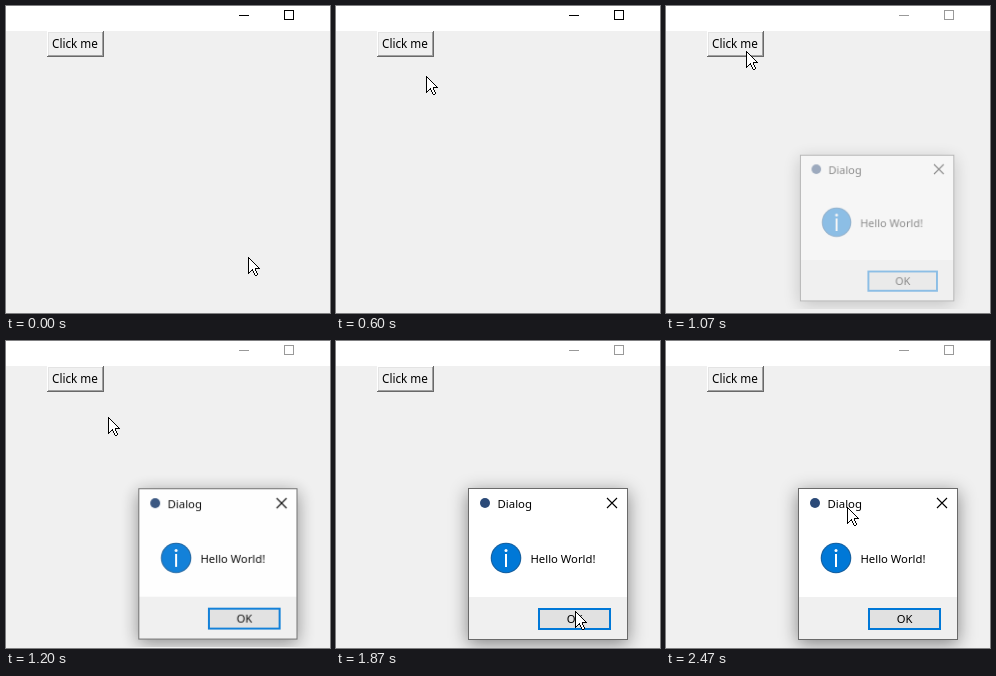
An HTML page with a canvas for the animation above (2.6 s loop, 324 px wide and 307 px high).

```html
<!DOCTYPE html>
<html lang="en">
<head>
<meta charset="utf-8">
<title>Click me</title>
<style>
html, body { margin: 0; width: 100%; height: 100%; overflow: hidden; background: #f0f0f0; }
canvas { display: block; }
</style>
</head>
<body>
<canvas id="stage" width="324" height="307"></canvas>
<script>
const W = 324, H = 307, LOOP = 2600, STEP = 1000 / 15;
const BLUE = '#0078d7', FACE = '#f0f0f0';
const FONT = '"Noto Sans", "Open Sans", sans-serif';
const stage = document.getElementById('stage').getContext('2d');
const layer = document.createElement('canvas');
layer.width = W;
layer.height = H;
const dialog = layer.getContext('2d');

// Where the pointer turns or rests: step, x, y
const TURNS = [
  [4, 242, 251], [9, 90, 70], [12, 80, 48], [16, 80, 45], [20, 145, 120],
  [21, 173, 130], [28, 239, 270], [30, 237, 278], [33, 194, 215], [37, 181, 166]
];

const clamp = v => Math.max(0, Math.min(1, v));
const smooth = v => v * v * (3 - 2 * v);

function box(c, color, x, y, w, h) {
  c.fillStyle = color;
  c.fillRect(x, y, w, h);
}

function frame(c, color, x, y, w, h, line = 1) {
  c.strokeStyle = color;
  c.lineWidth = line;
  c.strokeRect(x + line / 2, y + line / 2, w - line, h - line);
}

function disc(c, color, x, y, r) {
  c.fillStyle = color;
  c.beginPath();
  c.arc(x, y, r, 0, Math.PI * 2);
  c.fill();
}

function label(c, text, x, y, size, align = 'left') {
  c.font = `${size}px ${FONT}`;
  c.textAlign = align;
  c.fillStyle = '#000';
  c.fillText(text, x, y);
}

// Slope of one axis between turns i and i + 1; zero outside the path
function slope(i, axis) {
  const a = TURNS[i], b = TURNS[i + 1];
  return a && b ? (b[axis] - a[axis]) / (b[0] - a[0]) : 0;
}

// Harmonic mean of neighbouring slopes keeps the curve from overshooting
function tangent(i, axis) {
  const a = slope(i - 1, axis), b = slope(i, axis);
  return a * b > 0 ? 2 * a * b / (a + b) : 0;
}

function pointerAt(n) {
  const last = TURNS.length - 1;
  n = Math.max(TURNS[0][0], Math.min(TURNS[last][0], n));
  const i = Math.max(1, TURNS.findIndex(p => p[0] >= n)) - 1;
  const a = TURNS[i], b = TURNS[i + 1];
  const span = b[0] - a[0], k = (n - a[0]) / span;
  return [1, 2].map(axis => Math.round(
    a[axis] + (b[axis] - a[axis]) * smooth(k) +
    span * k * (1 - k) * ((1 - k) * tangent(i, axis) - k * tangent(i + 1, axis))
  ));
}

// The arrow is built row by row so that its edges stay crisp
function drawPointer(c, [x, y]) {
  for (let row = 0; row < 19; row++) {
    const edge = row < 12 ? row : 16 - row;
    if (edge >= 0) box(c, '#000', x, y + row, edge + 1, 1);
    if (edge > 1) box(c, '#fff', x + 1, y + row, edge - 1, 1);
    const tail = x + 4 + ((row - 12) >> 1);
    if (row > 11 && row < 18) {
      box(c, '#000', tail, y + row, 4, 1);
      box(c, '#fff', tail + 1, y + row, 2, 1);
    }
  }
  box(c, '#000', x + 7, y + 11, 5, 1);
  box(c, '#000', x + 7, y + 18, 2, 1);
}

function drawWindow(c, active, pressed) {
  box(c, FACE, 0, 0, W, H);
  box(c, '#fff', 0, 0, W, 25);
  const ink = active ? '#000' : '#999';
  box(c, ink, 233, 9, 10, 1);
  frame(c, ink, 278, 4, 10, 10);

  const edges = ['#696969', '#fff', '#a0a0a0', '#e3e3e3'];
  if (pressed) edges.reverse();
  const [outerDark, outerLight, innerDark, innerLight] = edges;
  box(c, outerDark, 41, 25, 57, 26);
  box(c, outerLight, 41, 25, 56, 25);
  box(c, innerDark, 42, 26, 55, 24);
  box(c, innerLight, 42, 26, 54, 23);
  box(c, FACE, 43, 27, 53, 22);
  const shift = pressed ? 1 : 0;
  label(c, 'Click me', 46 + shift, 42 + shift, 11.7);
}

function drawDialog(c, hover) {
  c.clearRect(0, 0, W, H);
  c.save();
  c.shadowColor = 'rgba(0,0,0,.45)';
  c.shadowBlur = 17;
  c.shadowOffsetY = 4;
  box(c, '#fff', 132, 147, 160, 152);
  c.restore();
  box(c, FACE, 133, 256, 158, 42);
  frame(c, '#6a6a6a', 132, 147, 160, 152);

  disc(c, '#2b4a78', 149, 162, 5);
  label(c, 'Dialog', 161.5, 167, 11.4);
  c.strokeStyle = '#000';
  c.lineWidth = 1.1;
  c.beginPath();
  for (const side of [-5, 5]) {
    c.moveTo(276 - side, 157);
    c.lineTo(276 + side, 167);
  }
  c.stroke();

  disc(c, '#17609f', 170, 217, 15.3);
  disc(c, BLUE, 170, 217, 14.2);
  disc(c, '#fff', 170, 209.5, 1.5);
  box(c, '#fff', 169, 213, 2, 13);
  label(c, 'Hello World!', 194.5, 222, 11.3);

  box(c, '#e1e1e1', 202, 267, 73, 22);
  frame(c, BLUE, 202, 267, 73, 22, 2);
  c.globalAlpha = hover;
  box(c, '#e5f1fb', 203, 268, 71, 20);
  c.globalAlpha = 1;
  label(c, 'OK', 238.5, 282, 11.2, 'center');
}

function render(time) {
  const n = Math.floor((time % LOOP + 4) / STEP);
  const open = smooth(clamp((n - 13.7) / 5.2));
  const hover = clamp((n - 28) / 3) * clamp((36 - n) / 3);

  drawWindow(stage, n < 15, n === 13 || n === 14);
  if (n >= 15) {
    drawDialog(dialog, hover);
    const scale = 0.94 + 0.06 * open;
    stage.save();
    stage.globalAlpha = open;
    stage.translate(186, 196);
    stage.scale(scale, scale);
    stage.drawImage(layer, -186, -196);
    stage.restore();
  }
  drawPointer(stage, pointerAt(n));
}

const start = performance.now();
function tick() {
  render(performance.now() - start);
  requestAnimationFrame(tick);
}
tick();
</script>
</body>
</html>
```
